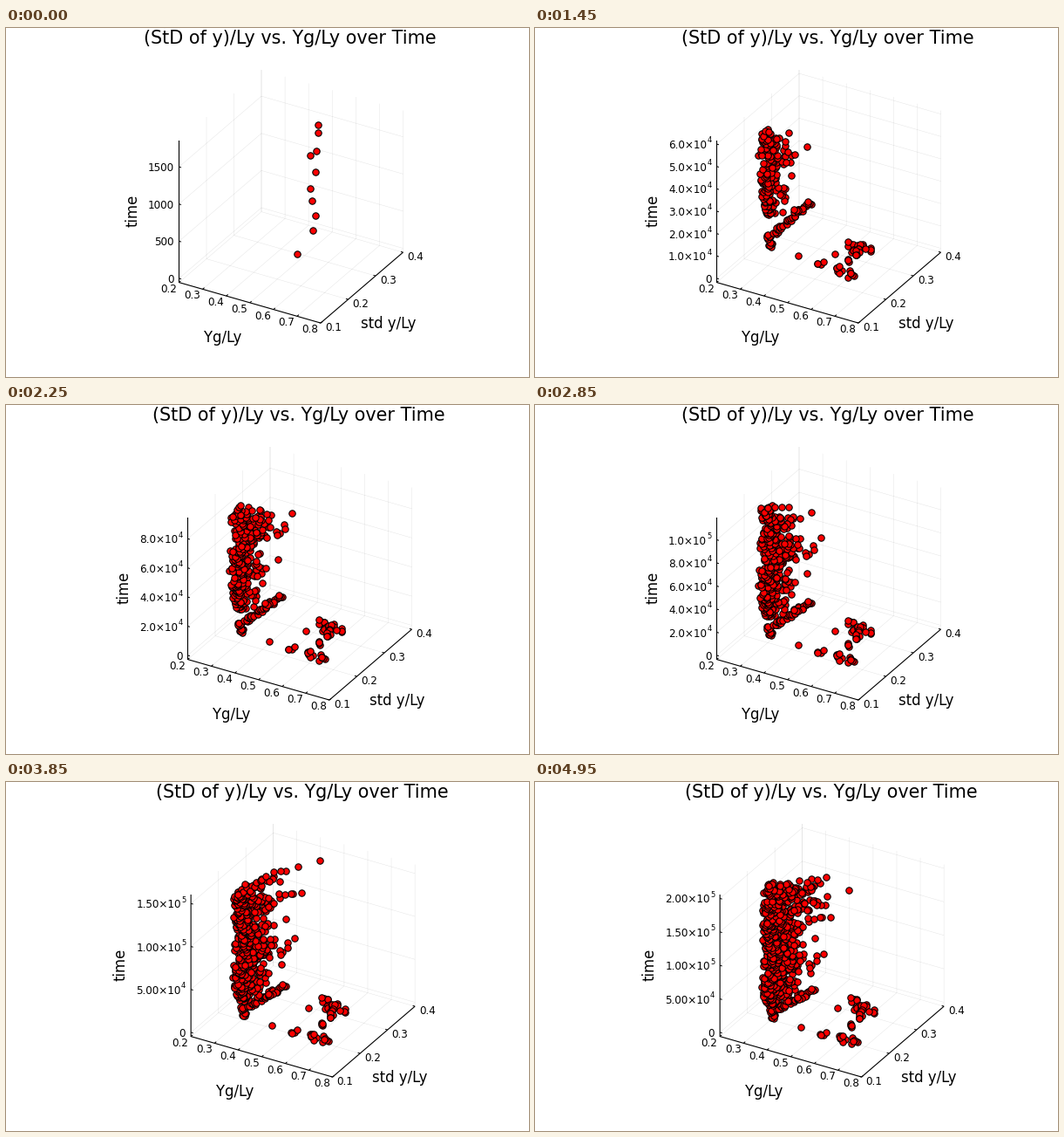
A matplotlib script for the animation above (5 s loop, 600 by 400 pixels).

```python
import math

import numpy as np
import matplotlib.pyplot as plt
from matplotlib.animation import FuncAnimation
from matplotlib.collections import LineCollection

W, H, DPI = 600, 400, 100
FRAMES, INTERVAL = 100, 50
PER_FRAME, STEP = 10, 200          # points added per frame, time between points
BOX_H, PAD = 162.6, 0.03           # height of the time axis, margin at each end
PX = 72 / DPI
TITLE, GUIDE, TICK, EXPONENT = 20.8, 16.5, 12, 8.4
NICE = [(1.0, 1.0), (5.0, 0.9), (2.0, 0.7), (2.5, 0.5), (3.0, 0.2)]

# Resting places of the early walk on the floor: x, y, number of points
STOPS = [(333.5, 259, 1), (353, 249, 6), (356, 261, 6), (362, 262, 11),
         (371, 264, 4), (360, 272, 6), (348, 282, 4), (352, 302, 6),
         (338, 301, 7), (318, 294.5, 4), (291.5, 289.6, 1), (260, 279, 6)]
# Later excursions from the home column: peak index, reach, rise, fall
BURSTS = [(107, 48, 42, 6), (234, 38, 9, 8), (345, 58, 28, 30),
          (403, 42, 22, 16), (505, 42, 25, 20), (632, 68, 25, 12),
          (666, 42, 10, 6), (780, 84, 30, 32), (915, 60, 55, 55)]
HOME = (252, 272)

plt.rcParams["font.family"] = "DejaVu Sans"


def make_walk():
    """Floor positions of all points, relative to the unshifted axes."""
    rng = np.random.default_rng(4)
    total = FRAMES * PER_FRAME
    i = np.arange(total)
    calm = i < 140

    # home column with a ragged right side
    ragged = np.minimum(rng.exponential(6.5, total), 30)
    ragged[calm] = 4 + 0.4 * ragged[calm]
    x = HOME[0] + ragged
    y = HOME[1] - 0.3 * ragged + 2

    # excursions climb along the wall and drop back lower
    share = np.where(calm, 1, rng.uniform(0.15, 1, total))
    for peak, reach, rise, fall in BURSTS:
        pulse = np.interp(i, [peak - rise, peak, peak + fall], [0, 1, 0])
        out = reach * pulse * share
        x += out
        y -= np.where(i <= peak, 0.36, 0.2) * out

    sx, sy = np.where(calm, 2.0, 3.3), np.where(calm, 1.6, 3.2)
    x += sx * np.clip(rng.standard_normal(total), -1.8, 1.8)
    y += sy * np.clip(rng.standard_normal(total), -1.8, 1.8)

    # early resting places replace the start of the column
    sizes = [n for _, _, n in STOPS]
    early = np.repeat([(a, b) for a, b, _ in STOPS], sizes, axis=0)
    early += 2.8 * np.clip(rng.standard_normal(early.shape), -1.6, 1.6) \
        * (np.repeat(sizes, sizes) > 1)[:, None]
    x[:len(early)], y[:len(early)] = early.T
    return x, y


WALK_X, WALK_Y = make_walk()


def pick_ticks(lo, hi):
    """Score candidate steps by count, coverage and niceness."""
    span = hi - lo
    best = (-math.inf, 0, 0)
    for power in range(5, 1, -1):
        for q, nice in NICE:
            step = q * 10.0 ** power
            count = int(hi // step) + 1
            if not 4 <= count <= 8:
                continue
            grain = 1 - abs(count - 5) / 5
            cover = 1.5 * span / ((count - 1) * step)
            score = 1 / 4 * grain + 1 / 6 + 1 / 3 * cover + 1 / 4 * nice
            best = max(best, (score, step, count))
    return [best[1] * k for k in range(best[2])]


def split(value):
    power = math.floor(math.log10(value))
    return value / 10.0 ** power, power


def tick_labels(ticks):
    """Return (text, exponent) pairs and the sideways shift they cause."""
    if ticks[-1] <= 10000:
        labels = [(f"{v:.0f}", "") for v in ticks]
        return labels, 4.0 * (len(labels[-1][0]) - 4)
    parts = [split(v) for v in ticks[1:]]
    digits = 1 + max(len(f"{m:g}".partition(".")[2]) for m, _ in parts)
    labels = [("0", "")] + [(f"{m:.{digits}f}×10", str(p)) for m, p in parts]
    return labels, 10 + 3.65 * (digits - 1)


fig = plt.figure(figsize=(W / DPI, H / DPI), dpi=DPI, facecolor="white")
ax = fig.add_axes([0, 0, 1, 1])


def text(x, y, s, size, ha="center", **kw):
    ax.text(x, y, s, fontsize=size * PX, ha=ha, va="baseline", color="black", **kw)


def lines(segments, color, width):
    ax.add_collection(LineCollection(segments, colors=color, linewidths=width * PX,
                                     capstyle="butt"))


def draw(n):
    ax.cla()
    ax.set_xlim(0, W)
    ax.set_ylim(H, 0)
    ax.axis("off")

    count = PER_FRAME * (n + 1)
    last = STEP * (count - 1)
    mid, reach = last / 2, last / 2 * (1 + 2 * PAD)
    lo, hi = mid - reach, mid + reach
    ticks = pick_ticks(lo, hi)
    labels, dx = tick_labels(ticks)
    levels = [(v - lo) / (hi - lo) for v in ticks]

    def place(a, b, c):
        return (198.5 + dx + 162.5 * a + 94.5 * b,
                291.6 + 46.5 * a - 81 * b - BOX_H * c)

    grid, marks = [], []
    for k in range(7):
        a = k / 6
        grid.append([place(a, 0, 0), place(a, 1, 0), place(a, 1, 1)])
        x, y = place(a, 0, 0)
        marks.append([(x, y), (x + 2, y - 1.7)])
        text(x - 12, y + 11, f"{0.2 + 0.1 * k:.1f}", TICK)
    for k in range(4):
        b = k / 3
        grid.append([place(1, b, 0), place(0, b, 0), place(0, b, 1)])
        x, y = place(1, b, 0)
        marks.append([(x, y), (x - 2.5, y - 0.7)])
        text(x + 14.5, y + 8.6, f"{0.1 + 0.1 * k:.1f}", TICK)
    for c, (base, power) in zip(levels, labels):
        grid.append([place(0, 0, c), place(0, 1, c), place(1, 1, c)])
        x, y = place(0, 0, c)
        marks.append([(x, y), (x + 2.5, y + 0.7)])
        right = x - 6
        if power:
            text(right, y - 1.6, power, EXPONENT, "right")
            right -= 0.636 * EXPONENT
        text(right, y + 5, base, TICK, "right")

    lines(grid, (0, 0, 0, 0.1), 0.5)
    lines([[place(0, 0, 1), place(0, 0, 0), place(1, 0, 0), place(1, 1, 0)]],
          "black", 1.1)
    lines(marks, "black", 1)

    text(325.8 + dx, 18, "(StD of y)/Ly vs. Yg/Ly over Time", TITLE)
    text(249 + dx, 360.3, "Yg/Ly", GUIDE)
    text(438.5 + dx, 343.6, "std y/Ly", GUIDE)
    text(150.3 - dx, 209, "time", GUIDE, rotation=90, rotation_mode="anchor")

    rise = BOX_H / (1 + 2 * PAD) * np.arange(count) / (count - 1)
    ax.scatter(WALK_X[:count] + dx, WALK_Y[:count] - rise, s=(7.4 * PX) ** 2,
               c="#ff0000", edgecolors="black", linewidths=1.1 * PX, zorder=3)
    return []


anim = FuncAnimation(fig, draw, frames=FRAMES, interval=INTERVAL,
                     init_func=lambda: [], repeat=True, repeat_delay=0)
plt.show()
```
